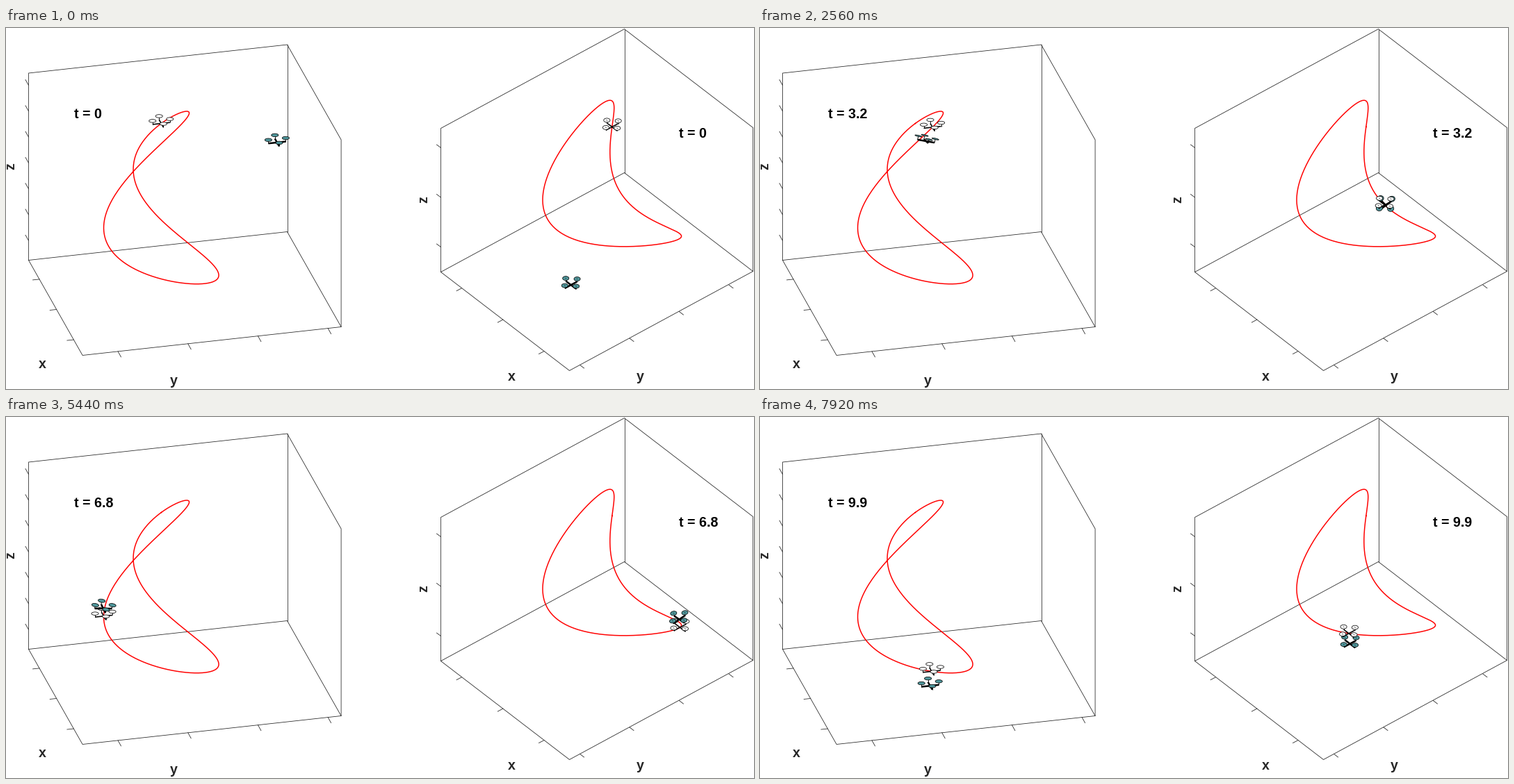
Write a matplotlib script that moves like this. It is 1076 px wide and 520 px high and loops after 8 s.

```python
import numpy as np
import matplotlib.pyplot as plt
from matplotlib.animation import FuncAnimation

W, H, DPI = 1076, 520, 100
FRAMES, INTERVAL, DT = 100, 80, 0.1
PX = 72 / DPI
INK = "#262626"
TEAL = "#4f969b"
ARM, MAST, ROTOR = 0.062, 0.027, 0.0245

fig = plt.figure(figsize=(W / DPI, H / DPI), dpi=DPI, facecolor="white")
ax = fig.add_axes([0, 0, 1, 1])
ax.set_xlim(-0.5, W - 0.5)
ax.set_ylim(H - 0.5, -0.5)
ax.axis("off")


class View:
    """Orthographic camera that maps world points to stage pixels."""

    def __init__(self, scale, azimuth, elevation, origin):
        a, e = np.radians([azimuth, elevation])
        self.origin = np.array(origin)
        self.matrix = scale * np.array([
            [np.cos(a), np.sin(a), 0],
            [np.sin(a) * np.sin(e), -np.cos(a) * np.sin(e), -np.cos(e)]])
        self.toward = np.array([np.sin(a) * np.cos(e),
                                -np.cos(a) * np.cos(e), np.sin(e)])

    def project(self, pts):
        return np.asarray(pts) @ self.matrix.T + self.origin

    def depth(self, pts):
        return float(np.mean(np.asarray(pts) @ self.toward))


VIEWS = [View(208, 76, 26.2, (222.8, 249)),
         View(187, 230, 40, (871.3, 227.9))]


def path(phase):
    return np.stack([-0.6 * np.sin(phase), 0.3 * np.sin(2 * phase),
                     0.6 * np.cos(phase)], axis=-1)


# Tracking error (x, y, z) and tilt (x, y) of the follower over time.
KNOTS = np.array([0, 1.1, 1.7, 2.2, 3.2, 4.4, 5.9, 7.7, 8.8, 9.9])
ERROR = np.array([
    [-.7, -.44, -.263, -.128, .057, -.012, .026, 0, 0, 0],
    [1, .699, .439, .202, -.06, .013, -.01, 0, 0, -.011],
    [-.6, -.525, -.41, -.286, -.073, .083, .113, 0, -.07, -.11]]).T
TILT = np.array([
    [0, .1, .12, 0, -.2, .17, .08, .06, 0, 0],
    [0, -.15, -.2, 0, .28, -.27, .12, .06, 0, 0]]).T
ERROR_SLOPE = np.gradient(ERROR, KNOTS, axis=0)
ERROR_SLOPE[0] = 0.2, -0.2, 0
TILT_SLOPE = np.gradient(TILT, KNOTS, axis=0)


def hermite(t, values, slopes):
    i = min(np.searchsorted(KNOTS, t, side="right") - 1, len(KNOTS) - 2)
    h = KNOTS[i + 1] - KNOTS[i]
    s = (t - KNOTS[i]) / h
    return ((1 + 2 * s) * (1 - s) ** 2 * values[i]
            + s * (1 - s) ** 2 * h * slopes[i]
            + s * s * (3 - 2 * s) * values[i + 1]
            + s * s * (s - 1) * h * slopes[i + 1])


def body_axes(nx, ny):
    up = np.array([nx, ny, np.sqrt(1 - nx * nx - ny * ny)])
    e1 = np.array([up[2], 0, -nx])
    e1 /= np.linalg.norm(e1)
    return e1, np.cross(up, e1), up


def line(pts, color=INK, width=0.8, **kw):
    xs, ys = zip(*pts)
    return ax.plot(xs, ys, color=color, lw=width * PX, **kw)[0]


def draw_box(corner, x, y, z):
    """Floor and two back walls; corner is the left floor corner."""
    c, x, y, z = (np.array(v, float) for v in (corner, x, y, z))
    line([c, c + x, c + x + y, c + y, c])
    line([c, c + z, c + y + z, c + x + y + z, c + x + y])
    line([c + y, c + y + z])


def draw_ticks(start, along, fractions, step):
    for f in fractions:
        p = np.array(start) + f * np.array(along)
        line([p, p + step])


draw_box((32, 334), (77.6, 137), (372, -41), (0, -269.5))
draw_ticks((32, 334), (77.6, 137), .2 + .318 * np.arange(3), (-9.5, 1))
draw_ticks((109.6, 471), (372, -41), .137 + .2707 * np.arange(4), (4.4, 8))
draw_ticks((32, 82), (0, 37.3), range(7), (-4.5, -8))

draw_box((625, 351), (185, 142), (264, -143), (0, -207))
draw_ticks((625, 351), (185, 142), .163 + .32 * np.arange(3), (-7.5, 4))
draw_ticks((810, 493), (264, -142), .057 + .2707 * np.arange(4), (6, 4.6))
draw_ticks((625, 172), (0, 71.5), range(3), (-6, -4.5))


def label(x, y, s, color=INK, **kw):
    return ax.text(x, y, s, color=color, family="Liberation Sans",
                   weight="bold", size=19.6 * PX, va="baseline", zorder=20, **kw)


for x, y, s in [(52, 490, "x"), (241, 513, "y"),
                (727, 508, "x"), (912, 508, "y")]:
    label(x, y, s, ha="center")
for x, y in [(12, 199), (606, 247)]:
    label(x, y, "z", ha="center", rotation=90, rotation_mode="anchor")

clocks = [label(x, y, "", "black", ha="left") for x, y in [(97, 130), (967, 158)]]

for view in VIEWS:
    line(view.project(path(np.linspace(0, 2 * np.pi, 400))), "red", 1.5, zorder=3)


class Drone:
    def __init__(self, view, face, arm_width):
        self.view = view
        stroke = dict(color="black", solid_capstyle="butt")
        self.arms = [ax.plot([], [], lw=arm_width * PX, **stroke)[0] for _ in range(4)]
        self.masts = [ax.plot([], [], lw=0.9 * PX, **stroke)[0] for _ in range(4)]
        self.discs = [ax.fill([0, 0, 0], [0, 0, 0], fc=face, ec="black",
                              lw=0.75 * PX)[0] for _ in range(4)]
        self.pins = [ax.plot([], [], lw=0.7 * PX, color=INK)[0] for _ in range(4)]

    def place(self, artist, pts, lift=0.0):
        xy = self.view.project(pts)
        if hasattr(artist, "set_xy"):
            artist.set_xy(xy)
        else:
            artist.set_data(xy[:, 0], xy[:, 1])
        artist.set_zorder(10 + self.view.depth(pts) + lift)

    def pose(self, hub, tilt):
        e1, e2, up = body_axes(*tilt)
        ang = np.linspace(0, 2 * np.pi, 28)[:, None]
        ring = ROTOR * (np.cos(ang) * e1 + np.sin(ang) * e2)
        for k, arm in enumerate((e1, e2, -e1, -e2)):
            end = hub + ARM * arm
            top = end + MAST * up
            self.place(self.arms[k], np.array([hub, end]))
            self.place(self.masts[k], np.array([end, top]))
            self.place(self.discs[k], top + ring)
            self.place(self.pins[k], np.array([top - 0.005 * e1, top + 0.005 * e1]),
                       0.0005)


guides = [Drone(v, "white", 1.6) for v in VIEWS]
followers = [Drone(v, TEAL, 2.5) for v in VIEWS]


def update(i):
    t = i * DT
    goal = path(t / 3)
    hub = goal + hermite(t, ERROR, ERROR_SLOPE)
    tilt = hermite(t, TILT, TILT_SLOPE)
    for drone in guides:
        drone.pose(goal, (0, 0))
    for drone in followers:
        drone.pose(hub, tilt)
    for clock in clocks:
        clock.set_text(f"t = {round(t, 1):g}")
    return []


anim = FuncAnimation(fig, update, frames=FRAMES, interval=INTERVAL,
                     init_func=lambda: update(0), repeat=True, repeat_delay=0)
plt.show()
```
